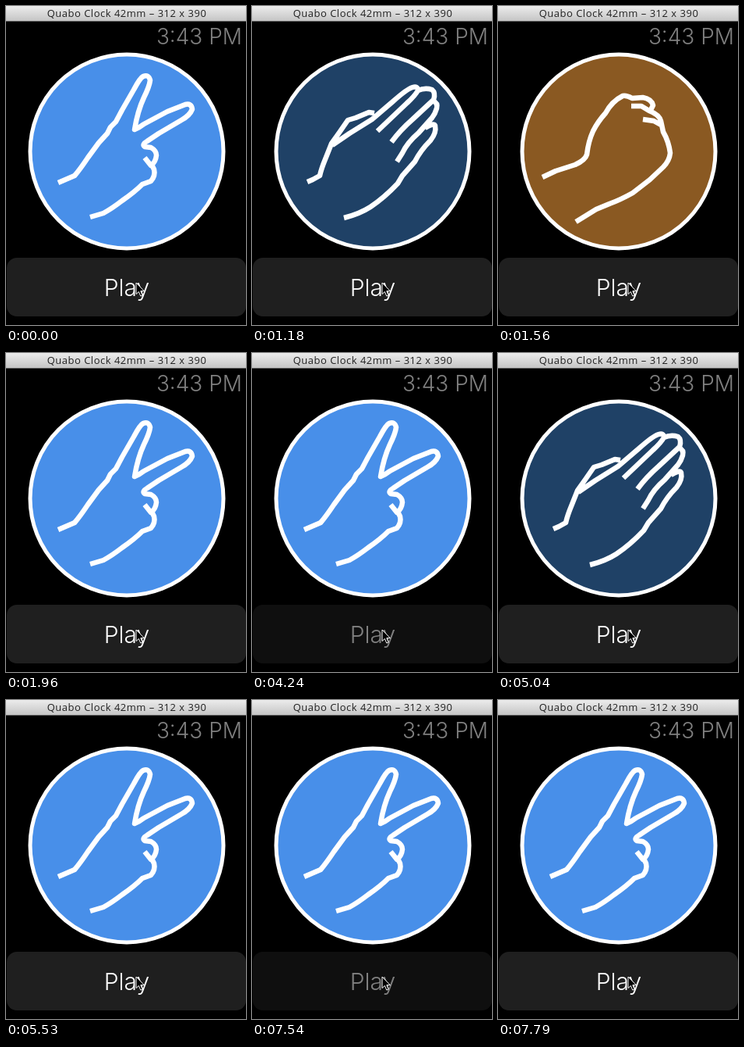
These frames come from a looping animation (308x408 px, 8000 ms). An HTML page:

```html
<!DOCTYPE html>
<html lang="en">
<head>
<meta charset="utf-8">
<style>
html, body { margin: 0; width: 100%; height: 100%; overflow: hidden; background: #000; }
svg { display: block; width: 308px; height: 408px; }
.hand path { fill: none; stroke: #fff; stroke-width: 6.5; stroke-linejoin: round; }
.clock { font-family: Inter, Roboto, sans-serif; font-weight: 350; }
</style>
</head>
<body>
<svg viewBox="0 0 308 408">
  <defs>
    <linearGradient id="bar" x2="0" y2="1">
      <stop stop-color="#ececec"/>
      <stop offset="1" stop-color="#c4c4c4"/>
    </linearGradient>
  </defs>
  <rect width="308" height="408"/>
  <rect width="308" height="19.5" fill="url(#bar)"/>
  <text x="155" y="14" text-anchor="middle" font-size="13" letter-spacing=".5" fill="#222" font-family="Open Sans, sans-serif">Quabo Clock 42mm – 312 x 390</text>
  <text class="clock" x="303" y="48.5" text-anchor="end" font-size="28" fill="#808080">3:43 PM</text>

  <circle id="disc" cx="155" cy="186" r="124" stroke="#fff" stroke-width="5"/>
  <g class="hand">
    <path d="M71 225L78 222L87 217Q89 208 94 196L102 176Q112 162 123 146L133 143L150 136L157 137M103 178L125 163L154 145L181 122Q199 106 206 104Q213 102 213 108Q209 115 199 124L161 160M213 108Q222 104 231 107Q236 111 233 120L206 145Q190 159 179 174M232 121Q239 124 237 131Q235 138 231 143L214 162Q199 175 193 188L186 199M222 156Q233 149 235 153Q237 162 229 172Q216 185 209 199L193 217L187 227Q170 245 152 257Q138 266 118 271"/>
  </g>
  <g class="hand">
    <path d="M57 219L74 211L99 203Q112 197 114 190Q116 173 122 160Q128 148 138 137Q146 122 160 115Q165 114 172 118L186 117Q197 119 199 127L196 133M171 128L184 128L194 134Q207 139 209 147L212 161Q219 173 221 188Q220 198 212 206L195 222Q182 232 173 239Q157 248 143 253L126 260L100 276M186 145L200 147L209 152"/>
  </g>
  <g class="hand">
    <path d="M67 226L88 217Q95 209 105 194L119 175L130 163L134 155L141 148L149 133L164 107Q172 92 176 90Q183 87 185 95Q184 103 177 117Q169 134 165 158Q172 155 177 151L207 135L230 126Q238 124 239 132Q236 140 225 146L196 163L181 173Q174 177 178 180L186 181Q193 185 193 191Q192 200 186 204L178 194M187 203L190 209Q192 217 186 224L175 228Q165 238 149 249Q136 259 125 265L108 270"/>
  </g>

  <g id="button" class="clock">
    <rect x="1" y="322" width="307" height="75" rx="13" fill="#1f1f1f"/>
    <text x="155" y="371" text-anchor="middle" font-size="30" fill="#fff">Play</text>
  </g>
  <path d="M167 354V368.5L170.4 365.4L172.8 371L175.2 370L172.8 364.6H177.3Z" stroke="#fff"/>
</svg>
<script>
const LOOP = 8000, FADE = 140, FLIP = 97;
const COLORS = ['#1f4166', '#8a5922', '#488fe9']; // paper, rock, scissors
const spins = [[1180, 1960], [4740, 5530]];
const presses = [[630, 860], [4240, 4450], [7540, 7790]];
const disc = document.getElementById('disc');
const button = document.getElementById('button');
const hands = document.querySelectorAll('.hand');
const active = (ranges, t) => ranges.find(([start, end]) => t >= start && t < end);

function draw(now) {
  const t = now % LOOP;
  const spin = active(spins, t);
  const press = active(presses, t);
  const pose = spin ? Math.floor((t - spin[0] + 10) / FLIP) % 3 : 2;
  disc.setAttribute('fill', COLORS[pose]);
  hands.forEach((hand, i) => hand.style.display = i === pose ? '' : 'none');
  button.style.opacity = press ? 0.5 + 0.5 * Math.max(0, 1 - (press[1] - t) / FADE) : 1;
  requestAnimationFrame(draw);
}
requestAnimationFrame(draw);
</script>
</body>
</html>
```
